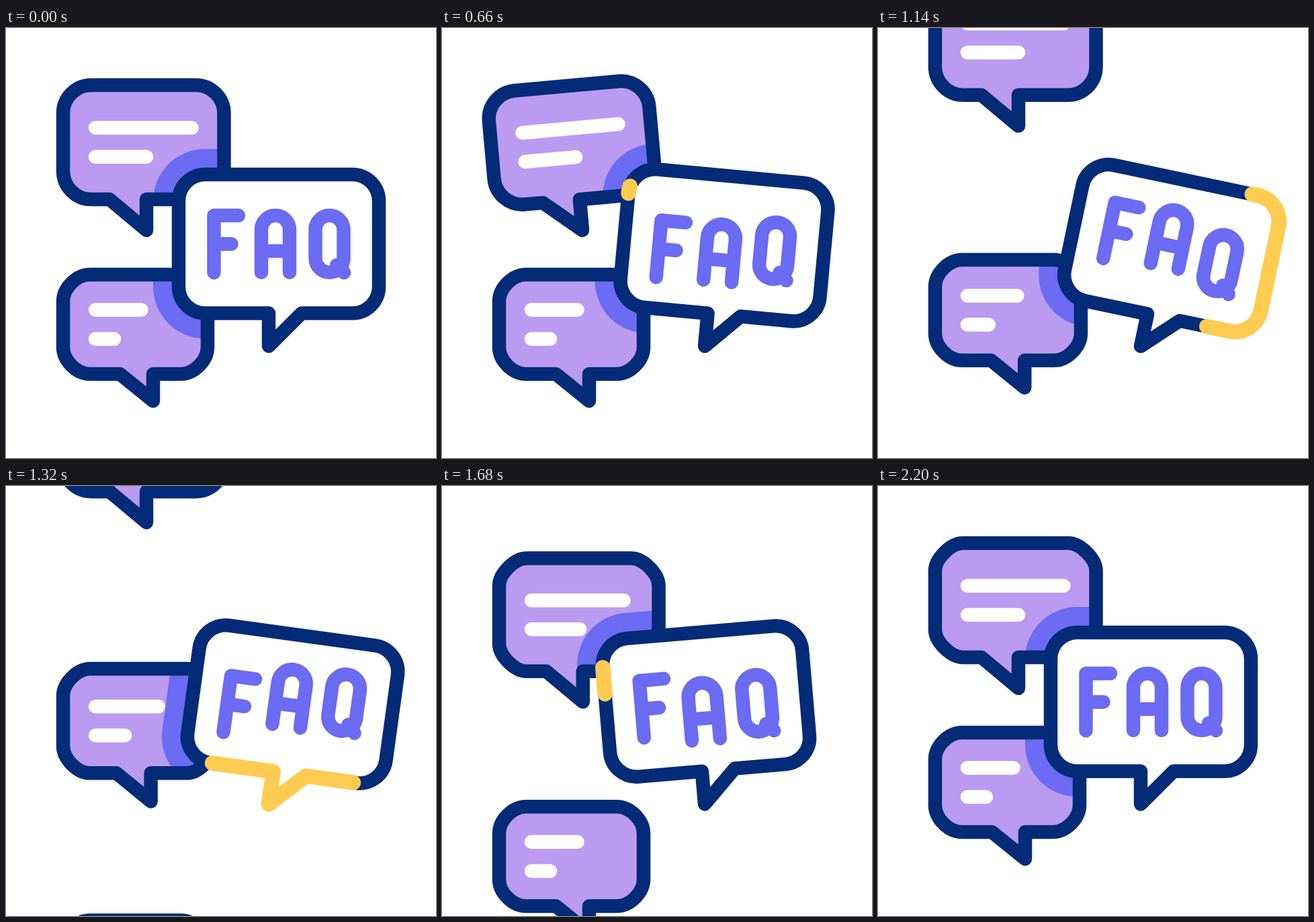
An HTML page with a canvas for the animation above (2400 ms loop, 640x640 px).

```html
<!DOCTYPE html>
<html lang="en">
<head>
<meta charset="utf-8">
<title>FAQ bubbles</title>
<style>
  html, body { margin: 0; width: 100%; height: 100%; overflow: hidden; background: #fff; }
  canvas { display: block; width: 640px; height: 640px; }
</style>
</head>
<body>
<canvas id="stage" width="640" height="640"></canvas>
<script>
const ctx = document.getElementById('stage').getContext('2d');
const LOOP = 2400, LINE = 20.5;
const NAVY = '#042b77', LILAC = '#ba9bf1', BLUE = '#6b6bf3', YELLOW = '#ffcb50', WHITE = '#fff';

// Value of an eased keyframe track [[time, value], ...] at time t.
function track(t, keys) {
  if (t <= keys[0][0]) return keys[0][1];
  for (let i = 1; i < keys.length; i++) {
    const [t0, a] = keys[i - 1], [t1, b] = keys[i];
    if (t < t1) {
      const u = (t - t0) / (t1 - t0);
      return a + (b - a) * u * u * (3 - 2 * u);
    }
  }
  return keys[keys.length - 1][1];
}

const UPPER = { right: 324.5, top: 85, bottom: 255, radius: 42, bend: 0.55, tailLeft: 154, tailRight: 209, tip: 301, textY: 148.5, long: 276.5, short: 209 };
const LOWER = { right: 300, top: 367, bottom: 515, radius: 40, bend: 0.5, tailLeft: 169.5, tailRight: 219, tip: 555, textY: 419.5, long: 201.5, short: 161 };
const UPPER_END = { ...UPPER, radius: 41, bend: 0.43 };

function blend(a, b, u) {
  const out = {};
  for (const key in a) out[key] = a[key] + (b[key] - a[key]) * u;
  return out;
}

const main = new Path2D();
main.moveTo(257, 257.5);
main.arcTo(257, 218, 296.5, 218, 39.5);
main.arcTo(555, 218, 555, 257.5, 39.5);
main.arcTo(555, 424.5, 515.5, 424.5, 39.5);
main.lineTo(440, 424.5);
main.lineTo(391, 473.5);
main.lineTo(391, 424.5);
main.arcTo(257, 424.5, 257, 385, 39.5);
main.lineTo(257, 257.5);
const MAIN_LENGTH = 39.5 * 2 * Math.PI + 219 + 127 * 2 + 75.5 + 49 * (1 + Math.SQRT2) + 94.5;

const shadow = new Path2D();
shadow.roundRect(219, 180, 374, 282.5, 77.5);

const letters = [
  'M346 279H309.5V364M309.5 321.5H335.5',
  'M380 363.7V300A21 21 0 0 1 422 300V363.7M380 332H422',
  'M460.5 300A21 21 0 0 1 502.5 300V342.7A21 21 0 0 1 460.5 342.7ZM492 353L503 364'
].map(d => new Path2D(d));

function stroke(path, color, width = LINE) {
  ctx.strokeStyle = color;
  ctx.lineWidth = width;
  ctx.stroke(path);
}

function rotate(degrees, x, y) {
  ctx.translate(x, y);
  ctx.rotate(degrees * Math.PI / 180);
  ctx.translate(-x, -y);
}

function bubblePath(b) {
  const p = new Path2D(), left = 85, r = b.radius, c = r * (1 - b.bend);
  p.moveTo(left + r, b.top);
  p.lineTo(b.right - r, b.top);
  p.bezierCurveTo(b.right - c, b.top, b.right, b.top + c, b.right, b.top + r);
  p.lineTo(b.right, b.bottom - r);
  p.bezierCurveTo(b.right, b.bottom - c, b.right - c, b.bottom, b.right - r, b.bottom);
  p.lineTo(b.tailRight, b.bottom);
  p.lineTo(b.tailRight, b.tip);
  p.lineTo(b.tailLeft, b.bottom);
  p.lineTo(left + r, b.bottom);
  p.bezierCurveTo(left + c, b.bottom, left, b.bottom - c, left, b.bottom - r);
  p.lineTo(left, b.top + r);
  p.bezierCurveTo(left, b.top + c, left + c, b.top, left + r, b.top);
  p.closePath();
  return p;
}

function drawBubble(b, tilt, shift, mainTilt) {
  const path = bubblePath(b);
  const place = () => {
    ctx.translate(0, shift);
    rotate(tilt, b.tailRight, b.tip);
  };

  // The shade follows the main bubble but stays inside this one.
  ctx.save();
  ctx.save();
  place();
  ctx.fillStyle = LILAC;
  ctx.fill(path);
  ctx.restore();
  const base = ctx.getTransform();
  place();
  ctx.clip(path);
  ctx.setTransform(base);
  rotate(mainTilt, 390.5, 473.5);
  ctx.fillStyle = BLUE;
  ctx.fill(shadow);
  ctx.restore();

  ctx.save();
  place();
  stroke(path, NAVY);
  const text = new Path2D();
  text.moveTo(133, b.textY);
  text.lineTo(b.long, b.textY);
  text.moveTo(133, b.textY + 43.2);
  text.lineTo(b.short, b.textY + 43.2);
  stroke(text, WHITE);
  ctx.restore();
}

function drawMain(t, tilt) {
  ctx.save();
  rotate(tilt, 390.5, 473.5);
  ctx.fillStyle = WHITE;
  ctx.fill(main);
  stroke(main, NAVY);

  letters.forEach((letter, i) => {
    const d = i * 200;
    const hop = track(t, [[200 + d, 0], [600 + d, 16], [1000 + d, -16], [1400 + d, 16], [1800 + d, 0]]);
    // The last letter settles faster so the loop closes on time.
    const late = i === 2 ? track(t, [[1800, 1], [2200, 0]]) : 1;
    ctx.save();
    ctx.translate(0, i === 2 && t > 1800 ? 16 * late : hop);
    stroke(letter, BLUE);
    ctx.restore();
  });

  const head = track(t, [[600, 0], [1600, MAIN_LENGTH]]);
  const tail = track(t, [[800, 0], [1800, MAIN_LENGTH]]);
  if (head > tail) {
    ctx.setLineDash([head - tail, 3000]);
    ctx.lineDashOffset = -tail;
    stroke(main, YELLOW, 22.5);
  }
  ctx.restore();
}

function draw(t) {
  ctx.setTransform(1, 0, 0, 1, 0, 0);
  ctx.fillStyle = WHITE;
  ctx.fillRect(0, 0, 640, 640);
  ctx.lineCap = ctx.lineJoin = 'round';

  const mainTilt = track(t, [[200, 0], [1200, 12], [1600, -7], [1900, 5], [2200, 0]]);
  const leaveTilt = track(t, [[200, 0], [480, -12.8], [800, 0]]);
  const leave = track(t, [[700, 0], [1600, -320]]);
  const rise = track(t, [[1000, 0], [1824, 1]]);
  const enter = track(t, [[1200, 297], [2020, 0]]);

  if (t < 1600) drawBubble(UPPER, leaveTilt, leave, mainTilt);
  drawBubble(blend(LOWER, UPPER_END, rise), 0, 0, mainTilt);
  if (t > 1200) drawBubble(LOWER, 0, enter, mainTilt);
  drawMain(t, mainTilt);
}

const start = performance.now();
function tick() {
  draw((performance.now() - start) % LOOP);
  requestAnimationFrame(tick);
}
tick();
</script>
</body>
</html>
```
